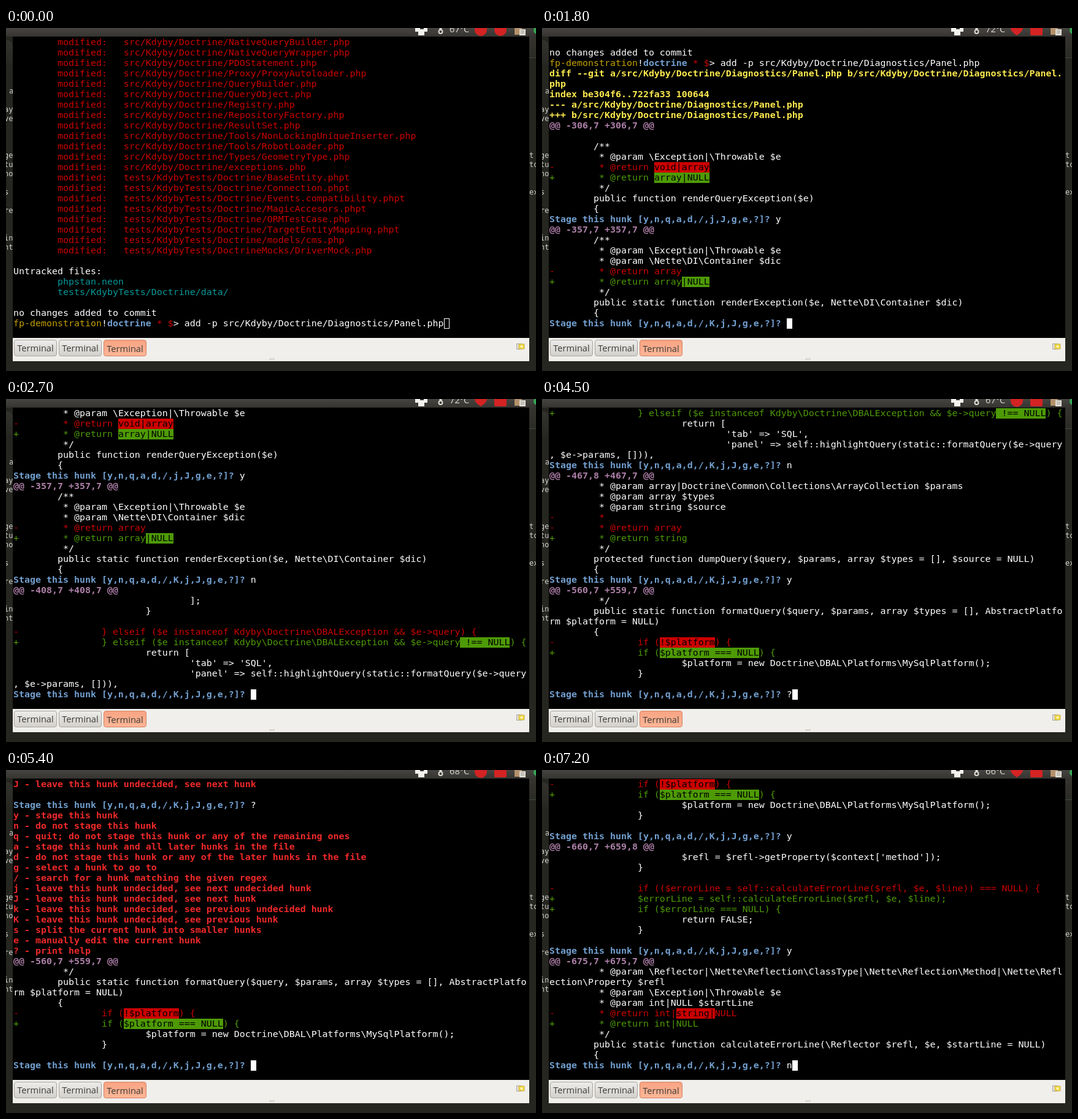
An HTML page that plays this animation: 864x560 px, repeating every 8000 ms.

```html
<!DOCTYPE html>
<html lang="en">
<head>
<meta charset="utf-8">
<title>Staging hunks in a terminal</title>
<style>
  html, body { margin: 0; width: 864px; height: 560px; overflow: hidden; background: #262621; }
  body { position: relative; }
  svg { position: absolute; left: 0; top: 0; }
  .ui { font: 14.67px "Open Sans", "Noto Sans", sans-serif; }
  .back { font: 12px "DejaVu Sans Mono", monospace; fill: #d4d4d0; }
  #win { position: absolute; left: 11px; top: 14px; width: 842px; height: 492px; background: #000; }
  #screen {
    position: absolute; left: 1px; top: 1px; width: 841px; height: 476px; overflow: hidden;
    font: 14.95px/17px "DejaVu Sans Mono", monospace; color: #fff; white-space: pre; tab-size: 8;
  }
  #screen div { height: 17px; }
  #log { position: absolute; left: 0; top: 0; }
  #top { position: absolute; left: 0; top: 0; width: 841px; background: #000; }
  #cursor { position: absolute; top: 459px; width: 9px; height: 17px; box-sizing: border-box; background: #fff; }
  #cursor.idle { background: none; border: 1px solid #fff; }
  .r { color: #c00; }
  .g { color: #4e9a06; }
  .c { color: #06989a; }
  .y { color: #c4a000; }
  .Y { color: #fce94f; font-weight: bold; }
  .m { color: #ad7fa8; font-weight: bold; }
  .b { color: #729fcf; font-weight: bold; }
  .R { color: #ef2929; font-weight: bold; }
  .x, .h { display: inline-block; height: 17px; vertical-align: top; color: #000; background: #c00; }
  .h { background: #4e9a06; }
  #tabs { position: absolute; left: 11px; top: 506px; width: 842px; height: 38px; background: #f0efeb; }
  .tab {
    position: absolute; top: 3px; width: 70px; height: 27px; box-sizing: border-box; line-height: 24px;
    text-align: center; color: #3c3b37; border: 1px solid #a9a49e; border-radius: 4px;
    background: linear-gradient(#ececea, #d3d0cc);
  }
  .tab.on { border-color: #d4805f; background: linear-gradient(#f8a483, #fdb697); line-height: 26px; }
</style>
</head>
<body>
<svg id="desk" width="864" height="560">
  <defs>
    <linearGradient id="bar" x2="0" y2="1"><stop stop-color="#454440"/><stop offset="1" stop-color="#353430"/></linearGradient>
    <linearGradient id="side" x2="0" y2="1"><stop stop-color="#35342f"/><stop offset="1" stop-color="#282823"/></linearGradient>
  </defs>
  <path d="M0 20q9 0 11 8V60H0ZM853 14h11v34h-11Z" fill="url(#side)"/>
  <path d="M853 48.5h11" stroke="#3d4a42"/>
  <rect width="864" height="14" fill="url(#bar)"/>
  <path d="M667 0h20v6h-5v6h-10V6h-5Z" fill="#f2f1ee"/>
  <path d="M675 1h6" stroke="#333" stroke-width="2"/>
  <path d="M708.5 0V4" stroke="#dfdbd2" stroke-width="4"/>
  <circle cx="708.5" cy="6" r="3" fill="none" stroke="#dfdbd2" stroke-width="2"/>
  <text id="temp" class="ui" x="723" y="7" fill="#dfdbd2"></text>
  <path id="load" fill="#d32323"/>
  <path id="mem" fill="#d32323"/>
  <path d="M829 0h12v11h-12Z" fill="#b3906a"/>
  <path d="M837 2h10v10h-10Z" fill="#dedbd4"/>
  <path d="M839 5h6M839 8h6" stroke="#8c8880"/>
  <circle cx="866" cy="4" r="6" fill="#34a853"/>
</svg>

<div id="win">
  <div id="screen"><div id="log"></div><div id="top"></div><div id="cursor"></div></div>
</div>

<div id="tabs" class="ui">
  <div class="tab" style="left:2px">Terminal</div>
  <div class="tab" style="left:75px">Terminal</div>
  <div class="tab on" style="left:148px">Terminal</div>
  <svg width="842" height="38">
    <path d="M821.5 9.500h8v9h-8Z" fill="#e4e2dd" stroke="#aaa69e"/>
    <path d="M825 10h9v8h-9Z" fill="#f4d63c" stroke="#c9b458"/>
    <circle cx="829.500" cy="14" r="2" fill="#fff6c0"/>
    <path d="M419 36l1-3M422 36l1-3M425 36l1-3" stroke="#b5b1aa"/>
  </svg>
</div>

<script>
const $ = id => document.getElementById(id);

// Markup: "~k" switches to style k, "^" is a tab.
const modified = (dir, names) =>
  names.split(' ').map(name => `~r^modified:   ${dir}/${name}`).join('\n');
const ask = '~bStage this hunk [y,n,q,a,d,/,K,j,J,g,e,?]?~w ';
const nextHunk = '~RJ - leave this hunk undecided, see next hunk';
const platformHunk = String.raw`~m@@ -560,7 +559,7 @@
^ */
^public static function formatQuery($query, $params, array $types = [], AbstractPlatfo
rm $platform = NULL)
^{
~r-^^if (~x!$platform~r) {
~g+^^if (~h$platform === NULL~g) {
^^^$platform = new Doctrine\DBAL\Platforms\MySqlPlatform();
^^}
`;

const log = String.raw`${modified('src/Kdyby/Doctrine', 'NativeQueryBuilder.php NativeQueryWrapper.php PDOStatement.php Proxy/ProxyAutoloader.php QueryBuilder.php QueryObject.php Registry.php RepositoryFactory.php ResultSet.php Tools/NonLockingUniqueInserter.php Tools/RobotLoader.php Types/GeometryType.php exceptions.php')}
${modified('tests/KdybyTests', 'Doctrine/BaseEntity.phpt Doctrine/Connection.phpt Doctrine/Events.compatibility.phpt Doctrine/MagicAccesors.phpt Doctrine/ORMTestCase.php Doctrine/TargetEntityMapping.phpt Doctrine/models/cms.php DoctrineMocks/DriverMock.php')}

Untracked files:
~c^phpstan.neon
~c^tests/KdybyTests/Doctrine/data/

no changes added to commit
~yfp-demonstration~w!~bdoctrine~r * $~w> add -p src/Kdyby/Doctrine/Diagnostics/Panel.php
~Ydiff --git a/src/Kdyby/Doctrine/Diagnostics/Panel.php b/src/Kdyby/Doctrine/Diagnostics/Panel.
~Yphp
~Yindex be304f6..722fa33 100644
~Y--- a/src/Kdyby/Doctrine/Diagnostics/Panel.php
~Y+++ b/src/Kdyby/Doctrine/Diagnostics/Panel.php
~m@@ -306,7 +306,7 @@

^/**
^ * @param \Exception|\Throwable $e
~r-^ * @return ~xvoid|array
~g+^ * @return ~harray|NULL
^ */
^public function renderQueryException($e)
^{
${ask.replace('K,', '')}y
~m@@ -357,7 +357,7 @@
^/**
^ * @param \Exception|\Throwable $e
^ * @param \Nette\DI\Container $dic
~r-^ * @return array
~g+^ * @return array~h|NULL
^ */
^public static function renderException($e, Nette\DI\Container $dic)
^{
${ask}n
~m@@ -408,7 +408,7 @@
^^^^];
^^^}

~r-^^} elseif ($e instanceof Kdyby\Doctrine\DBALException && $e->query) {
~g+^^} elseif ($e instanceof Kdyby\Doctrine\DBALException && $e->query~h !== NULL~g) {
^^^return [
^^^^'tab' => 'SQL',
^^^^'panel' => self::highlightQuery(static::formatQuery($e->query
, $e->params, [])),
${ask}n
~m@@ -467,8 +467,7 @@
^ * @param array|Doctrine\Common\Collections\ArrayCollection $params
^ * @param array $types
^ * @param string $source
~r-^ *
~r-^ * @return array
~g+^ * @return string
^ */
^protected function dumpQuery($query, $params, array $types = [], $source = NULL)
^{
${ask}y
${platformHunk}
${ask}?
~Ry - stage this hunk
~Rn - do not stage this hunk
~Rq - quit; do not stage this hunk or any of the remaining ones
~Ra - stage this hunk and all later hunks in the file
~Rd - do not stage this hunk or any of the later hunks in the file
~Rg - select a hunk to go to
~R/ - search for a hunk matching the given regex
~Rj - leave this hunk undecided, see next undecided hunk
${nextHunk}
~Rk - leave this hunk undecided, see previous undecided hunk
~RK - leave this hunk undecided, see previous hunk
~Rs - split the current hunk into smaller hunks
~Re - manually edit the current hunk
~R? - print help
${platformHunk}
${ask}y
~m@@ -660,7 +659,8 @@
^^^$refl = $refl->getProperty($context['method']);
^^}

~r-^^if (($errorLine = self::calculateErrorLine($refl, $e, $line)) === NULL) {
~g+^^$errorLine = self::calculateErrorLine($refl, $e, $line);
~g+^^if ($errorLine === NULL) {
^^^return FALSE;
^^}

${ask}y
~m@@ -675,7 +675,7 @@
^ * @param \Reflector|\Nette\Reflection\ClassType|\Nette\Reflection\Method|\Nette\Refl
ection\Property $refl
^ * @param \Exception|\Throwable $e
^ * @param int|NULL $startLine
~r-^ * @return int|~xstring|~rNULL
~g+^ * @return int|NULL
^ */
^public static function calculateErrorLine(\Reflector $refl, $e, $startLine = NULL)
^{
${ask}n`;

function addLine(box, line) {
  const row = document.createElement('div');
  const parts = ('~w' + line.replace(/\^/g, '\t')).split(/~(.)/);
  for (let i = 1; i < parts.length; i += 2) {
    if (!parts[i + 1]) continue;
    const span = document.createElement('span');
    span.className = parts[i];
    span.textContent = parts[i + 1];
    row.append(span);
  }
  box.append(row);
}
log.split('\n').forEach(line => addLine($('log'), line));
addLine($('top'), nextHunk);

// Slivers of the window behind
const slivers = [
  [5, 107, 'a'], [-3, 137, 'ay'], [-3, 152, 've'], [-3, 212, 'ge'], [-3, 227, 'tu'], [-3, 242, 'no'],
  [-3, 272, 's'], [-3, 302, 're'], [-3, 347, 'in'], [-3, 362, 'nt'],
  [853, 212, 't'], [853, 227, 'to'], [853, 272, 'ex']
];
for (const [x, y, str] of slivers) {
  const text = document.createElementNS('http://www.w3.org/2000/svg', 'text');
  text.setAttribute('class', 'back');
  text.setAttribute('x', x);
  text.setAttribute('y', y);
  text.textContent = str;
  $('desk').append(text);
}

const disc = x => `M${x - 10} 3a10 10 0 0 0 20 0V0h-20Z`;
const heart = x => `M${x - 10} 0h20q0 6-10 12q-10-6-10-12Z`;
const square = x => `M${x - 10} 0h20v10q0 2-2 2h-16q-2 0-2-2Z`;

// Last log line, cursor column, temperature, load icon, memory icon
const steps = [
  [27, 78, 67, disc, disc],
  [42, 41, 70, heart, square],
  [52, 43, 72, heart, square],
  [63, 43, 72, heart, square],
  [74, 44, 70, heart, square],
  [85, 44, 67, disc, square],
  [110, 43, 68, disc, square],
  [110, 44, 70, disc, square],
  [132, 44, 66, heart, square]
];
const STEP = 900, LOOP = 8000, ROWS = 28;
let shown = -1;

function show(n) {
  const [last, col, temp, load, mem] = steps[n];
  $('log').style.top = (ROWS - 1 - last) * 17 + 'px';
  $('cursor').style.left = col * 9 + 'px';
  $('cursor').className = n ? '' : 'idle';
  $('top').hidden = last !== 110;
  $('temp').textContent = temp + '°C';
  $('load').setAttribute('d', load(774));
  $('mem').setAttribute('d', mem(806));
  shown = n;
}

const start = performance.now();
function tick() {
  const n = Math.floor((performance.now() - start) % LOOP / STEP);
  if (n !== shown) show(n);
  requestAnimationFrame(tick);
}
tick();
</script>
</body>
</html>
```
